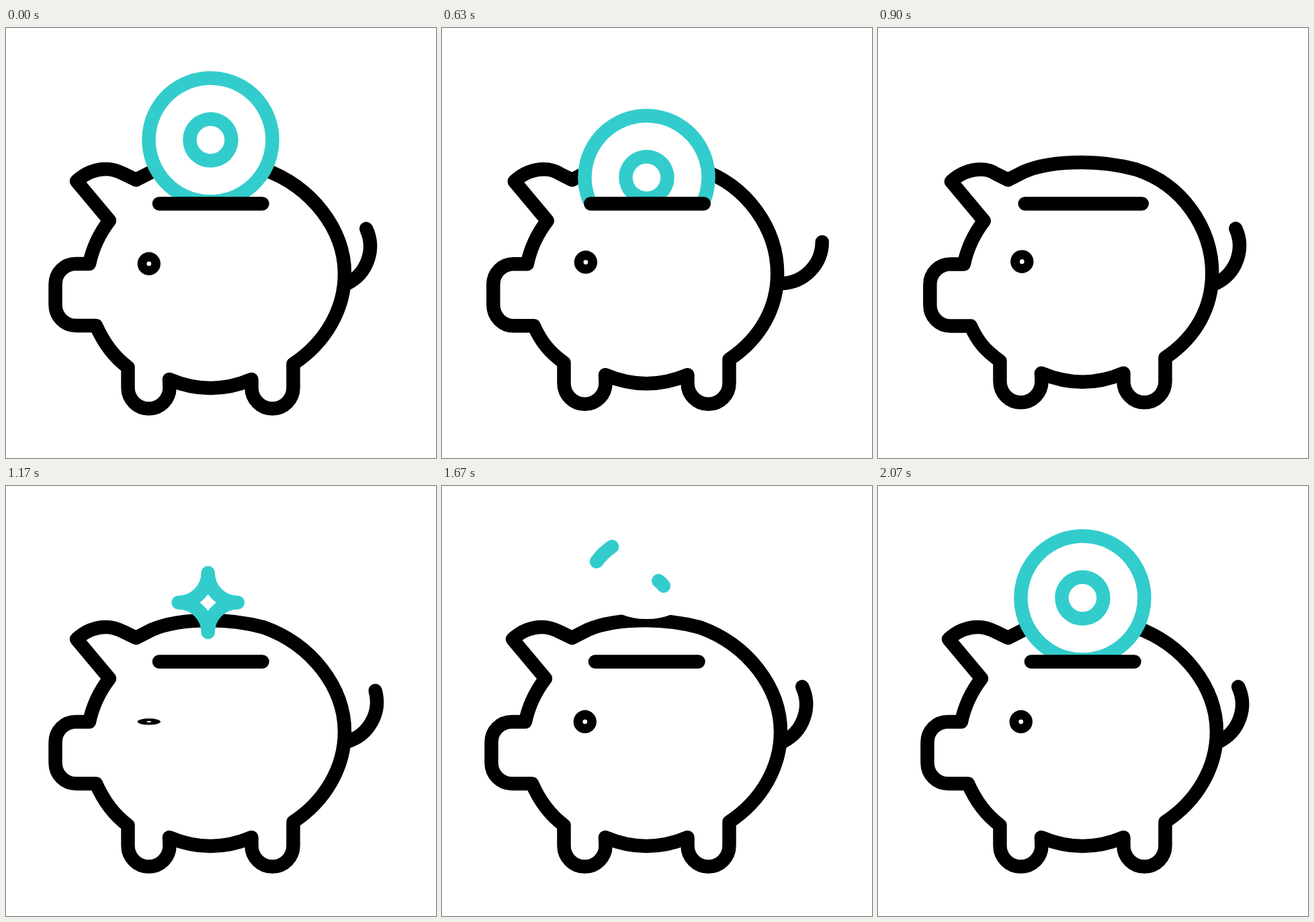
An HTML page with a canvas that plays this animation: 640 px wide and 640 px high, repeating every 2500 ms.

```html
<!DOCTYPE html>
<html lang="en">
<head>
<meta charset="utf-8">
<title>Piggy bank</title>
<style>
html, body { margin: 0; width: 100%; height: 100%; overflow: hidden; background: #fff; }
canvas { display: block; width: 640px; height: 640px; }
</style>
</head>
<body>
<canvas id="stage" width="640" height="640"></canvas>
<script>
const ctx = document.getElementById('stage').getContext('2d');
const LOOP = 2500, STEP = 100 / 3;
const TEAL = '#33cccc', LINE = 20.5;
const CX = 304.5, COIN_Y = 166.5, SLOT_Y = 261.5;
const DEG = Math.PI / 180;

const ramp = (t, a, b) => Math.min(1, Math.max(0, (t - a) / (b - a)));
const ease = (t, a, b) => { const u = ramp(t, a, b); return u * u * (3 - 2 * u); };
const bump = (t, a, peak, b) => t < peak ? ease(t, a, peak) : 1 - ease(t, peak, b);

function stroke(color) {
  ctx.strokeStyle = color;
  ctx.stroke();
}

function disc(y, r) {
  ctx.beginPath();
  ctx.arc(CX, y, r, 0, 2 * Math.PI);
  ctx.fillStyle = '#fff';
  ctx.fill();
}

// k is the amount of squash, 0 to 1
function drawBody(k) {
  const head = (...v) => v.map((n, i) => n + (i % 2 ? k : 7.5 * k));
  const foot = (x, y) => [x, y - 18 * k];
  const line = p => ctx.lineTo(...p);
  const curve = p => ctx.bezierCurveTo(...p);
  const side = 504 - 13 * k;

  ctx.beginPath();
  // ear and back
  ctx.moveTo(...head(105, 228));
  curve(head(118, 216, 133, 210, 149, 210));
  curve([...head(160, 210, 167, 213), 175 + 3 * k, 217 + k]);
  ctx.lineTo(193.5, 226);
  ctx.lineTo(217, 214);
  curve([240, 204, 271, 200, 304, 200]);
  curve([332, 200, 360, 204, 384, 210.5]);
  curve([455 - 5 * k, 236 - 7 * k, side, 300 - 5 * k, side, 366 - k]);
  curve([side, 418 - 8 * k, 476 - 2 * k, 468 - 18 * k, ...foot(427.5, 500)]);
  // legs and belly
  ctx.arc(...foot(396.5, 535.5), 31, 0, Math.PI);
  line(foot(365.5, 523));
  ctx.quadraticCurveTo(...foot(CX, 549), ...foot(243, 523));
  ctx.arc(...foot(212.5, 535.5), 31, 0, Math.PI);
  line(foot(181.5, 505));
  // cheek and snout
  curve([160 - 2 * k, 489 - 19 * k, 145 + 7 * k, 468 - 2 * k, ...head(134, 443)]);
  line(head(104, 443));
  curve(head(87, 443, 73.5, 429, 73.5, 412));
  line(head(73.5, 381.5));
  curve(head(73.5, 364, 87, 351, 104, 351));
  line(head(124, 351));
  curve(head(129, 327, 139, 306, 154, 286.5));
  ctx.closePath();
  stroke('#000');
}

function drawTail(k, angle) {
  ctx.save();
  ctx.translate(508 - 9 * k, 382 - k);
  ctx.rotate(angle * DEG);
  ctx.beginPath();
  ctx.arc(-28, -57, 62, -25 * DEG, 64 * DEG);
  stroke('#000');
  ctx.restore();
}

function drawEye(k, open) {
  ctx.save();
  ctx.translate(212.8 + 3 * k, 350.8 - 6 * k);
  ctx.scale(1, open);
  ctx.beginPath();
  ctx.arc(0, 0, 17.2, 0, 2 * Math.PI);
  ctx.arc(0, 0, 3.4, 0, 2 * Math.PI);
  ctx.fillStyle = '#000';
  ctx.fill('evenodd');
  ctx.restore();
}

function drawRing(y, r, start, part) {
  ctx.beginPath();
  ctx.arc(CX, y, r, start * DEG, (start + 360 * part) * DEG);
  stroke(TEAL);
}

function drawCoin(y, part) {
  drawRing(y, 92, -144, part);
  drawRing(y, 31, -55, part);
}

function drawStar(r) {
  ctx.save();
  ctx.translate(300.7, 173.5);
  ctx.beginPath();
  for (let i = 0; i < 4; i++) {
    ctx.arc(r, -r, r, Math.PI, Math.PI / 2, true);
    ctx.rotate(Math.PI / 2);
  }
  ctx.closePath();
  stroke(TEAL);
  ctx.restore();
}

function wagAngle(t) {
  if (t <= 533 || t >= 1600) return 0;
  const period = 1067 / 3;
  return 32 * bump((t - 533) % period, 0, 142, period);
}

function draw(t) {
  const k = bump(t, 533, 775, 1030);
  ctx.clearRect(0, 0, 640, 640);
  ctx.lineWidth = LINE;
  ctx.lineCap = ctx.lineJoin = 'round';

  drawBody(k);
  drawTail(k, wagAngle(t));

  ctx.save();
  ctx.beginPath();
  ctx.rect(0, 0, 640, SLOT_Y);
  ctx.clip();
  if (t < 950) {
    const y = COIN_Y + 205 * ease(t, 491, 905);
    // the coin hides the back only while it stands above the slot
    disc(y, 100);
    drawCoin(y, 1);
  } else if (t > 1601) {
    const part = ease(t, 1600, 2066);
    disc(COIN_Y - 74 * (1 - part), 101.5);
    drawCoin(COIN_Y, part);
  }
  ctx.restore();

  ctx.beginPath();
  ctx.moveTo(228 - 18 * k, SLOT_Y);
  ctx.lineTo(381.5 + 22 * k, SLOT_Y);
  stroke('#000');

  drawEye(k, 1 - 0.86 * bump(t, 1067, 1200, 1333));

  const r = 46 * Math.min(ease(t, 1033, 1185), 1 - ease(t, 1445, 1600));
  if (r > 0.5) drawStar(r);
}

const begin = performance.now();
function tick() {
  const t = (performance.now() - begin) % LOOP;
  draw(Math.floor((t + 5) / STEP) * STEP);
  requestAnimationFrame(tick);
}
tick();
</script>
</body>
</html>
```
